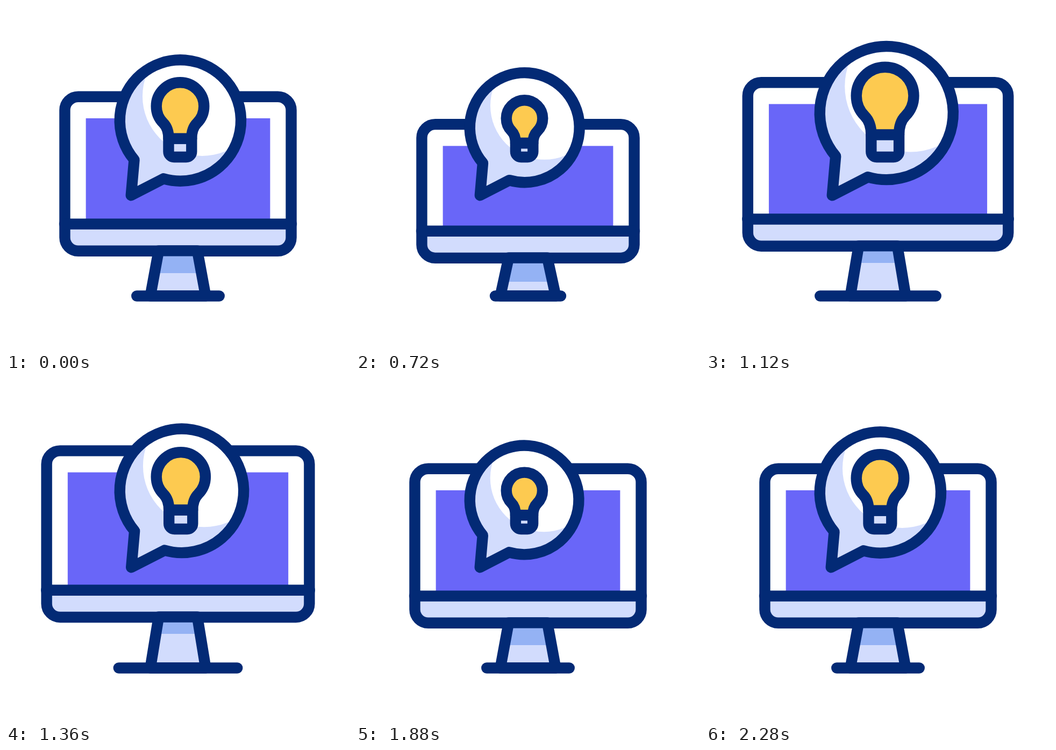
These frames come from a looping animation (640 px wide and 640 px high, 3 s). An HTML page with a canvas:

```html
<!DOCTYPE html>
<html lang="en">
<head>
<meta charset="utf-8">
<title>Idea on a monitor</title>
<style>
  html, body { margin: 0; width: 100%; height: 100%; overflow: hidden; background: #fff; }
  canvas { display: block; width: 100vw; height: 100vh; }
</style>
</head>
<body>
<canvas width="640" height="640"></canvas>
<script>
const ctx = document.querySelector('canvas').getContext('2d');
const LOOP = 3000, STEP = 40, SIZE = 640;
const NAVY = '#032a75', PURPLE = '#6966f8', LIGHT = '#d2dcfd',
      BLUE = '#94b2f4', YELLOW = '#fdca50', WHITE = '#fff';

// Poses: left edge, top edge, divider y, foot left edge, stand shadow y
const REST = [99.2, 158.5, 405.6, 233, 497.5];
const SMALL = [112.2, 210, 418.7, 248.8, 513];
const LARGE = [61.2, 121, 393.4, 195.4, 473.6];
const monitorTrack = { times: [190, 730, 1230, 1860], poses: [REST, SMALL, LARGE, REST] };

// Poses: growth of the bubble, growth of the bulb
const bubbleTrack = {
  times: [195, 506, 1170, 1662, 2265],
  poses: [[0, 0], [-36, -34], [23.7, 19], [-32.2, -30.3], [0, 0]]
};

function poseAt({ times, poses }, t) {
  if (t <= times[0]) return poses[0];
  const i = times.findIndex(end => t < end);
  if (i < 0) return poses[poses.length - 1];
  const u = (t - times[i - 1]) / (times[i] - times[i - 1]);
  const ease = u * u * (3 - 2 * u);
  return poses[i - 1].map((v, k) => v + (poses[i][k] - v) * ease);
}

// Two flat colours that meet at height y
function split(above, below, y) {
  const g = ctx.createLinearGradient(0, 0, 0, SIZE);
  g.addColorStop(0, above);
  g.addColorStop(y / SIZE, above);
  g.addColorStop(y / SIZE, below);
  g.addColorStop(1, below);
  return g;
}

function paint(path, fill) {
  if (fill) {
    ctx.fillStyle = fill;
    ctx.fill(path);
  }
  ctx.stroke(path);
}

function line(x1, x2, y) {
  const path = new Path2D();
  path.moveTo(x1, y);
  path.lineTo(x2, y);
  paint(path);
}

function drawMonitor([left, top, divider, foot, shadow]) {
  const x = left + 10.2, y = top + 10.2, bottom = divider + 50.2;

  const stand = new Path2D();
  stand.moveTo(284, bottom - 0.4);
  stand.lineTo(SIZE - 284, bottom - 0.4);
  stand.lineTo(SIZE - 268.5, 539.5);
  stand.lineTo(268.5, 539.5);
  stand.closePath();

  const body = new Path2D();
  body.roundRect(x, y, SIZE - 2 * x, bottom - y, 25);
  ctx.fillStyle = split(WHITE, LIGHT, divider);
  ctx.fill(body);
  ctx.fillStyle = PURPLE;
  ctx.fillRect(left + 49.4, top + 50.4, SIZE - 2 * (left + 49.4), divider - top - 50.4);
  paint(body);
  line(x - 0.5, SIZE - x + 0.5, divider);
  paint(stand, split(BLUE, LIGHT, shadow));
  line(foot + 10.2, SIZE - foot - 10.2, 539.5);
}

function drawBubble(grow) {
  const x = 324.4 + grow / 2, y = 213 - 0.615 * grow, r = 112.7 + grow / 2;
  const bubble = new Path2D();
  bubble.arc(x, y, r, Math.atan2(0.646, -0.76), Math.atan2(0.957, -0.277));
  bubble.lineTo(232.7 + 0.09 * grow, 352.3);
  bubble.closePath();

  ctx.fillStyle = LIGHT;
  ctx.fill(bubble);
  ctx.save();
  ctx.clip(bubble);
  ctx.fillStyle = WHITE;
  ctx.beginPath();
  ctx.arc(x + 0.36 * r, y - 0.4 * r, 0.985 * r, 0, 7);
  ctx.fill();
  ctx.restore();
  paint(bubble);
}

function drawBulb(grow) {
  const x = 324 + grow / 2, y = 186.5 - 1.07 * grow, r = 44.3 + grow / 2;
  const left = 302.5 + 0.265 * grow, right = 345.3 + 0.76 * grow;
  const bar = 246.6 - 0.4 * grow, base = 281;
  const d = r * Math.SQRT1_2;

  const glass = new Path2D();
  glass.moveTo(left, bar);
  glass.quadraticCurveTo(left, y + d + left - (x - d), x - d, y + d);
  glass.arc(x, y, r, Math.PI * 0.75, Math.PI * 0.25);
  glass.quadraticCurveTo(right, y + d + x + d - right, right, bar);
  glass.closePath();

  const socket = new Path2D();
  socket.roundRect(left, bar, right - left, base - bar, [0, 0, 10, 10]);
  paint(socket, LIGHT);
  paint(glass, YELLOW);
}

function draw(now) {
  const t = Math.floor(now % LOOP / STEP) * STEP;
  ctx.fillStyle = WHITE;
  ctx.fillRect(0, 0, SIZE, SIZE);
  ctx.strokeStyle = NAVY;
  ctx.lineWidth = 20.4;
  ctx.lineCap = ctx.lineJoin = 'round';

  const [bubble, bulb] = poseAt(bubbleTrack, t);
  drawMonitor(poseAt(monitorTrack, t));
  drawBubble(bubble);
  drawBulb(bulb);
  requestAnimationFrame(() => draw(performance.now()));
}
draw(performance.now());
</script>
</body>
</html>
```
